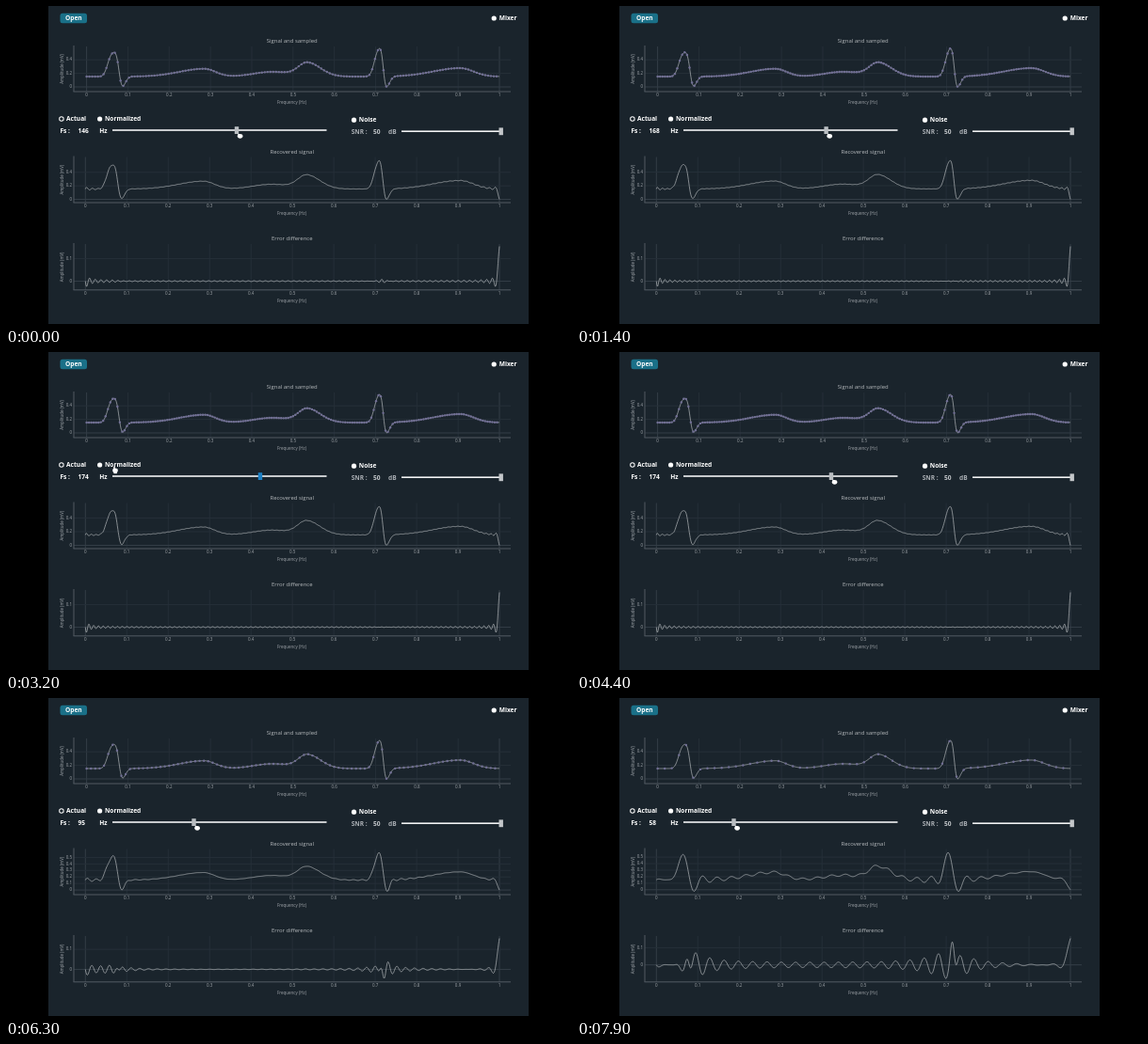
Recreate the animation shown at these times as an HTML page with a canvas. Size 600 by 338 pixels, loop 8000 ms.

```html
<!DOCTYPE html>
<html lang="en">
<head>
<meta charset="utf-8">
<title>Signal sampling</title>
<style>
html, body { margin: 0; width: 600px; height: 338px; overflow: hidden; background: #000; }
canvas { display: block; }
</style>
</head>
<body>
<canvas id="stage" width="600" height="338"></canvas>
<script>
const ctx = document.getElementById('stage').getContext('2d');
const FONT = '"Open Sans", "Noto Sans", sans-serif';
const LOOP = 8000, STEP = 100, POINTS = 880;

// Keyframes: time, value(s)
const rateKeys = [[0, 146], [1400, 168], [2300, 174], [4400, 174], [5300, 116], [6300, 95], [7000, 75], [7900, 58]];
const handKeys = [[2400, 273, 138], [3100, 116, 126], [3300, 116, 126], [3700, 62, 122], [4000, 62, 122], [4400, 273, 138]];

function at(keys, t, col = 1) {
  let i = 1;
  while (i < keys.length - 1 && keys[i][0] < t) i++;
  const a = keys[i - 1], b = keys[i];
  return a[col] + (b[col] - a[col]) * Math.min(1, Math.max(0, (t - a[0]) / (b[0] - a[0])));
}

// Normal cumulative distribution
function smoothStep(z) {
  const k = 1 / (1 + .2316419 * Math.abs(z));
  const tail = Math.exp(-z * z / 2) * .3989423 * k *
    (.3193815 + k * (-.3565638 + k * (1.781478 + k * (-1.821256 + k * 1.330274))));
  return z > 0 ? 1 - tail : tail;
}

// Bell with its own width on each side
const bump = (t, centre, left, right, height) =>
  height * Math.exp(-(((t - centre) / (t < centre ? left : right)) ** 2) / 2);

// Sharp heartbeat: rise, fall below the baseline, recovery
function beat(t, fall, lag, height, width) {
  const dip = .21;
  return height * smoothStep((t - fall + lag) / .0075)
    - (height + dip) * smoothStep((t - fall) / width)
    + dip * smoothStep((t - fall - .0145) / .007);
}

const signal = t => .153
  + beat(t, .0785, .0275, .37, .0052) + beat(t, .7187, .0217, .445, .0043)
  + bump(t, .285, .06, .027, .115) + bump(t, .45, .045, .045, .07)
  + bump(t, .535, .022, .032, .2) + bump(t, .905, .065, .032, .125);

const sinc = x => Math.abs(x) < 1e-7 ? 1 : Math.sin(Math.PI * x) / (Math.PI * x);
const times = Array.from({ length: POINTS + 1 }, (_, i) => i / POINTS);
const wave = times.map(signal);

// Sinc interpolation with a trace of residual ripple
const recover = (rate, samples) => times.map(t =>
  samples.reduce((v, s, k) => v + s * sinc(rate * t - k), .0015 * Math.sin(Math.PI * rate * t)));

function text(str, x, y, size, color, align = 'left', weight = '') {
  ctx.font = `${weight} ${size}px ${FONT}`;
  ctx.fillStyle = color;
  ctx.textAlign = align;
  ctx.textBaseline = 'middle';
  ctx.fillText(str, x, y);
}
const label = (str, x, y, color = '#fff') => text(str, x, y, 6.6, color, 'left', 'bold');

function rect(x, y, w, h, color) {
  ctx.fillStyle = color;
  ctx.fillRect(x, y, w, h);
}

function dot(x, y, r, color = '#fff') {
  ctx.fillStyle = color;
  ctx.beginPath();
  ctx.arc(x, y, r, 0, 7);
  ctx.fill();
}

function plot(title, top, bottom, x0, toY, tick, values) {
  const toX = t => x0 + (524 - x0) * t;
  for (let i = 0; i <= 10; i++) {
    const x = toX(i / 10);
    rect(x - .5, top, 1, bottom - top, i % 10 ? '#252f38' : '#333d46');
    text(String(i / 10), x, bottom + 4, 4.5, '#a0a5aa', 'center');
  }
  for (let i = -3; i < 8; i++) {
    const v = i * tick, y = toY(v);
    if (y < top + 2 || y > bottom - 1) continue;
    rect(72, y - .5, 464, 1, i ? '#252f38' : '#333d46');
    text(String(+v.toFixed(1)).replace('-', '\u2212'), 70, y, 4.5, '#a0a5aa', 'right');
  }
  rect(71.5, top - 1, 1, bottom - top + 1, '#525b63');
  rect(71.5, bottom - .5, 464.5, 1, '#525b63');
  text(title, 303.7, top - 5.4, 5.95, '#b6babd', 'center');
  text('Frequency (Hz)', 303.5, bottom + 11.6, 4.5, '#a0a5aa', 'center');
  ctx.save();
  ctx.translate(60, (top + bottom) / 2);
  ctx.rotate(-Math.PI / 2);
  text('Amplitude (mV)', 0, 0, 4.4, '#a6abb0', 'center');
  ctx.restore();
  ctx.beginPath();
  values.forEach((v, i) => ctx.lineTo(toX(times[i]), toY(v)));
  ctx.strokeStyle = '#b4b8bb';
  ctx.lineWidth = .7;
  ctx.lineJoin = 'round';
  ctx.stroke();
  return toX;
}

// Scale that places the data's extremes on the given rows
function fit(values, high, low) {
  const max = Math.max(...values), min = Math.min(...values);
  return v => low - (v - min) / (max - min) * (low - high);
}

function hand(x, y, pointing) {
  ctx.fillStyle = '#fff';
  ctx.beginPath();
  ctx.ellipse(x, y, 2.8, 2.4, 0, 0, 7);
  ctx.fill();
  if (pointing) {
    ctx.fillRect(x - 1.8, y - 4.3, 1.5, 5);
    ctx.fillRect(x - 1.6, y + 1, 3.4, 2.2);
  } else {
    ctx.fillRect(x - 2.2, y - 2.3, 2, 2);
  }
}

function drawControls(rate, handleX, free) {
  ctx.fillStyle = '#1a7088';
  ctx.beginPath();
  ctx.roundRect(57.5, 7.7, 28.5, 10.6, 2.5);
  ctx.fill();
  label('Open', 63, 13);
  dot(518.2, 13, 2.6);
  label('Mixer', 523.7, 13.2);

  dot(58.9, 120, 2.75);
  dot(58.9, 120, 1.8, '#1a242c');
  label('Actual', 64, 120.4);
  dot(99.6, 120, 2.6);
  label('Normalized', 105, 120.4);
  label('Fs :', 57.5, 133);
  label(String(rate), 76.5, 133);
  label('Hz', 99.3, 133);
  rect(113, 131.2, 227.5, 1.6, '#f2f3f4');
  rect(handleX - 2.2, 128.2, 4.4, 7.8, free ? '#1c7fc4' : '#b9bdc1');

  dot(369.5, 121.2, 2.6);
  label('Noise', 374.8, 121.6);
  label('SNR :', 366.7, 134.3, '#a9aeb3');
  label('50', 390, 134.3, '#c3c7ca');
  label('dB', 406, 134.3, '#a9aeb3');
  rect(420, 132.4, 106, 1.6, '#f2f3f4');
  rect(523.5, 129.4, 4.4, 7.8, '#c4c7ca');
}

function draw(t) {
  const rate = Math.round(at(rateKeys, t));
  const samples = Array.from({ length: rate }, (_, k) => signal(k / rate));
  const recovered = recover(rate, samples);
  const error = wave.map((v, i) => v - recovered[i]);
  const handleX = 166.5 + (rate - 58) * .892;
  const free = t > 2400 && t < 4400;

  rect(0, 0, 600, 338, '#000');
  rect(45, 0, 510, 338, '#1a242c');

  const topY = v => 86 - 72 * v;
  const toX = plot('Signal and sampled', 43, 91, 85.6, topY, .2, wave);
  samples.forEach((s, k) => dot(toX(k / rate), topY(s), 1.2, '#716f95'));
  plot('Recovered signal', 160.5, 209, 84.3, fit(recovered, 164.3, 205.5), rate < 105 ? .1 : .2, recovered);
  plot('Error difference', 253, 301.8, 84.3, fit(error, 255.5, 298), .1, error);

  drawControls(rate, handleX, free);
  if (free) hand(at(handKeys, t), at(handKeys, t, 2), true);
  else hand(handleX + 3.6, 138.3, false);
}

let shown = -1;
function frame(now) {
  const t = Math.floor(now % LOOP / STEP) * STEP;
  if (t !== shown) draw(shown = t);
  requestAnimationFrame(frame);
}
draw(0);
requestAnimationFrame(frame);
</script>
</body>
</html>
```
